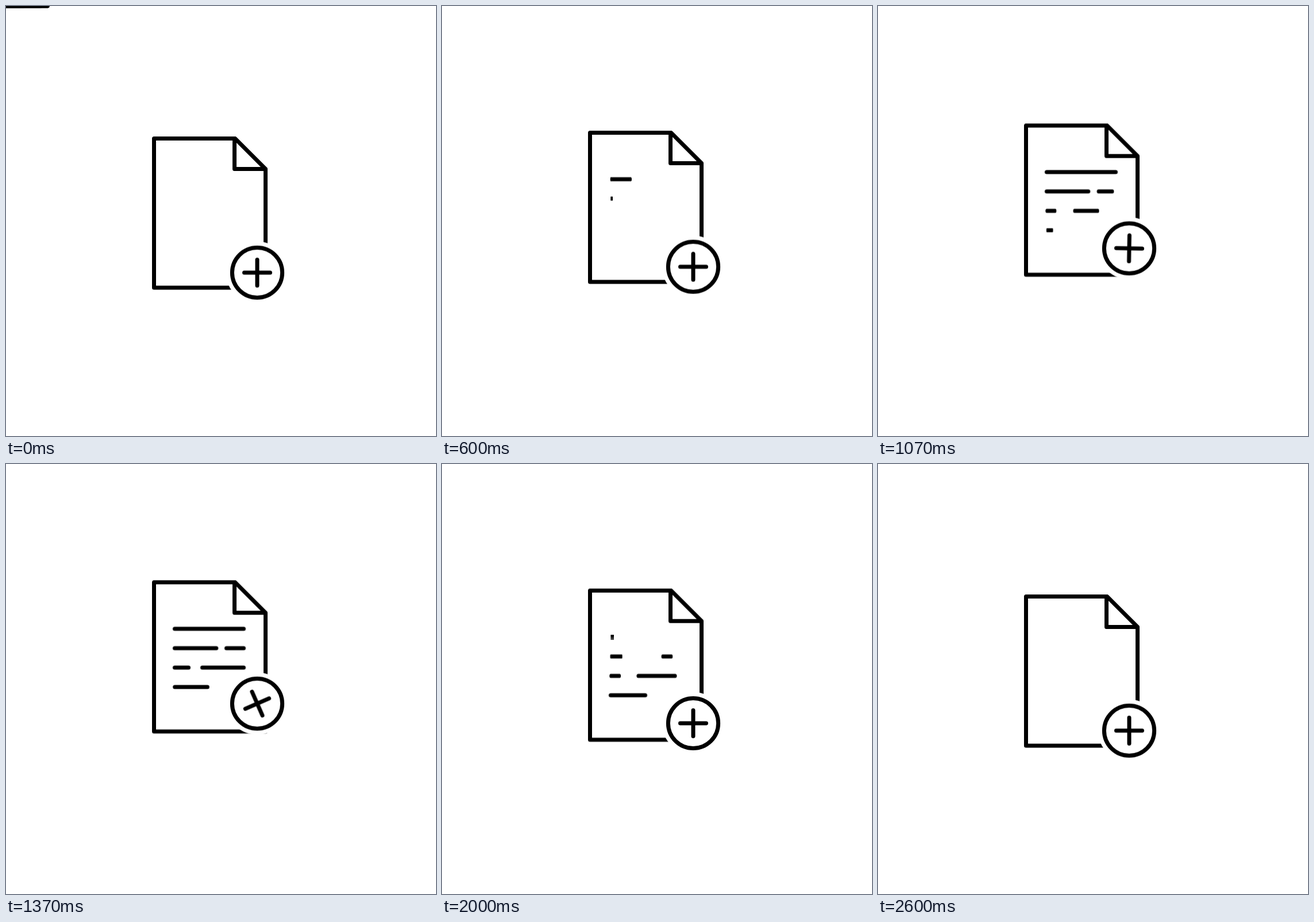
An HTML page without scripts that plays this animation: 748x748 px, repeating every 2.63 s.

```html
<!DOCTYPE html>
<html lang="en">
<head>
<meta charset="utf-8">
<title>Add a document</title>
<style>
  html, body { margin: 0; width: 100%; height: 100%; overflow: hidden; background: #fff; }
  svg { display: block; width: 100%; height: 100%; }

  .icon, .badge, .plus, .line { animation: 2630ms infinite both; }
  .icon {
    fill: none; stroke: #000; stroke-width: 7;
    stroke-linecap: round; stroke-linejoin: round;
    animation-name: float;
  }
  .badge { animation-name: lift; }
  .plus { animation-name: turn; animation-timing-function: cubic-bezier(.33, 0, .67, 1); }
  .gap { fill: #fff; stroke: none; }

  /* Each line grows at --in and shrinks at --out, pinned to its left end. */
  .line {
    translate: var(--x) var(--y);
    animation-name: grow, shrink;
    animation-timing-function: cubic-bezier(.33, 0, .67, 1);
    animation-delay: calc(var(--in) - 2630ms), calc(var(--out) - 1200ms - 2630ms);
  }

  @keyframes float {
    0%, 1.14% { transform: none; animation-timing-function: cubic-bezier(.35, 0, .68, 1); }
    49.81% { transform: translateY(-25px); animation-timing-function: cubic-bezier(.235, 0, .68, 1); }
    99.2%, 100% { transform: none; }
  }
  @keyframes lift {
    0%, 21.67% { transform: translate(437px, 463.8px); animation-timing-function: cubic-bezier(.33, 0, .67, 1); }
    45.9%, 57.2% { transform: translate(437px, 441.5px); animation-timing-function: cubic-bezier(.33, 0, .67, 1); }
    81%, 100% { transform: translate(437px, 463.8px); }
  }
  @keyframes turn {
    0%, 39.5% { transform: rotate(0deg); }
    58.5%, 100% { transform: rotate(90deg); }
  }
  @keyframes grow {
    0% { transform: scaleX(0); }
    19%, 80% { transform: scaleX(1); }
    80.01%, 100% { transform: scaleX(0); }
  }
  @keyframes shrink {
    0%, 45.63% { scale: 1 1; }
    64.64%, 100% { scale: 0 1; }
  }
</style>
</head>
<body>
<svg viewBox="0 0 748 748">
  <g class="icon">
    <path d="M397.5 230.5H257.5V490H451.5V283.5L398.5 230.5M397.5 230.5V283.5H451.5"/>

    <path class="line" d="M0 0h120" style="--x:293.5px; --y:311.4px; --in:422ms; --out:1565ms"/>
    <path class="line" d="M0 0h72.3" style="--x:293.5px; --y:345.1px; --in:536ms; --out:1671ms"/>
    <path class="line" d="M0 0h30" style="--x:383.5px; --y:345.1px; --in:712ms; --out:1762ms"/>
    <path class="line" d="M0 0h24" style="--x:293.5px; --y:378.9px; --in:782ms; --out:1798ms"/>
    <path class="line" d="M0 0h72" style="--x:341.5px; --y:378.9px; --in:797ms; --out:1897ms"/>
    <path class="line" d="M0 0h60" style="--x:293.5px; --y:412.6px; --in:939ms; --out:2078ms"/>

    <g class="badge">
      <circle class="gap" r="54.2"/>
      <circle r="43.6"/>
      <path class="plus" d="M-22.5 0h45M0-22.5v45"/>
    </g>
  </g>
</svg>
</body>
</html>
```
